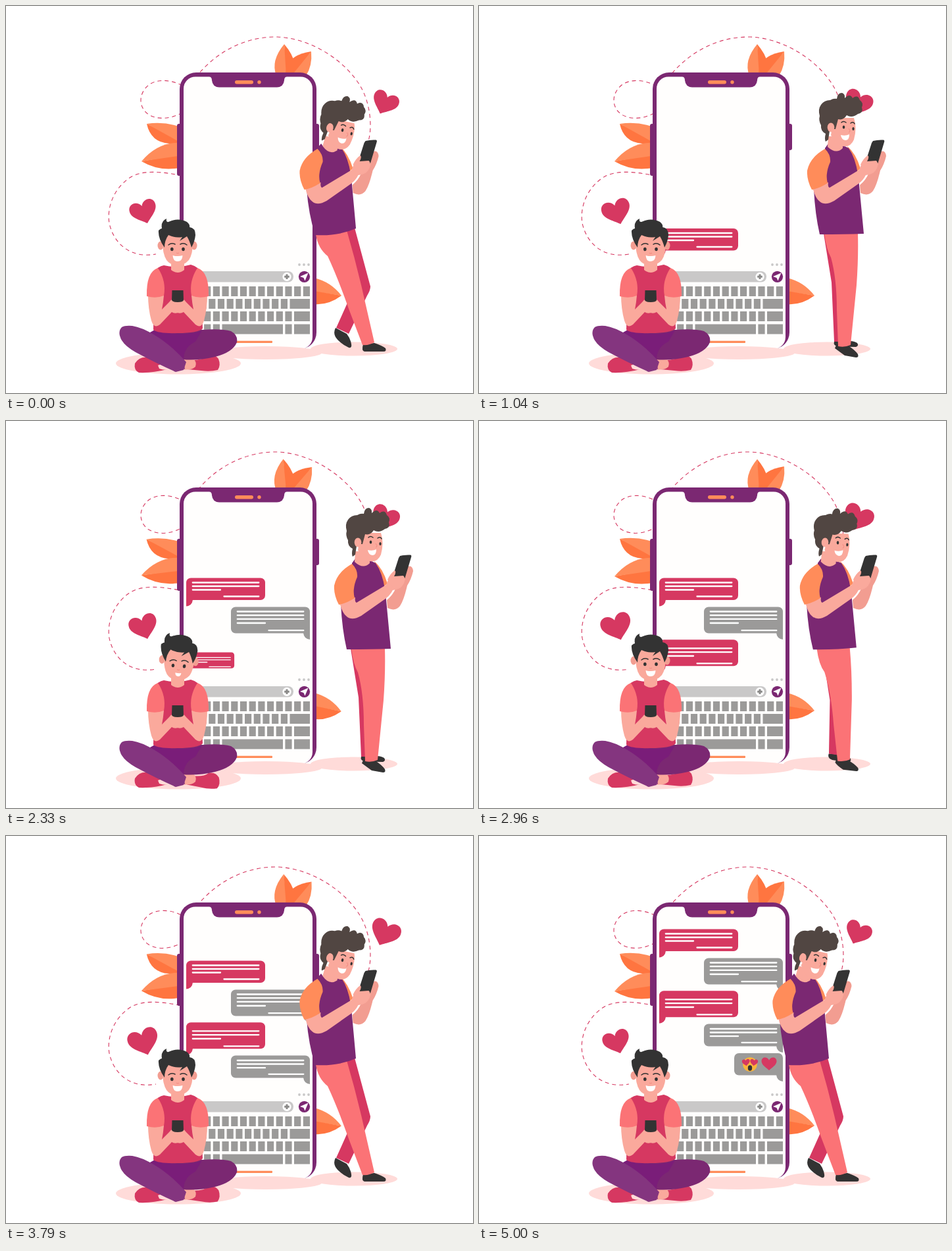
An HTML page that plays this animation: 710x588 px, repeating every 5040 ms.

```html
<!DOCTYPE html>
<html lang="en">
<head>
<meta charset="utf-8">
<title>Chat</title>
<style>
html, body { margin: 0; width: 100%; height: 100%; overflow: hidden; background: #fff; }
svg { display: block; width: 710px; height: 588px; }
.purple { fill: #7b2872 } .red { fill: #d63861 } .salmon { fill: #fb7376 }
.skin { fill: #faa99c } .shade { fill: #f29d91 } .dark { fill: #333 }
.hair { fill: #514642 } .light { fill: #ff8c5a } .deep { fill: #ff7540 }
.grey { fill: #9b9a99 } .pale { fill: #c9c8c8 } .pink { fill: #ffdbd9 } .white { fill: #fff }
.dash { fill: none; stroke: #d63861; stroke-width: 1.1; stroke-dasharray: 6 5 }
.brow { fill: none; stroke: #333; stroke-width: 1.5; stroke-linecap: round }
</style>
</head>
<body>
<svg viewBox="0 0 710 588">
  <defs>
    <path id="heart" class="red" d="M0 18C-7 11-20.500 4-20.500-6.500C-20.500-19-5-20.500 0-9.500C5-20.500 20.500-19 20.500-6.500C20.500 4 7 11 0 18Z"/>
    <g id="arm">
      <path class="skin" d="M216 439L240 440Q239 452 237 461L249 449Q252 443 261 447L266 464Q258 469 252 465L234 484Q225 491 221 478Q216 460 216 439Z"/>
      <path class="salmon" d="M231 398Q213 404 214 441Q228 445 240 440Q244 418 231 398Z"/>
    </g>
  </defs>

  <path class="dash" d="M288 109C320 68 366 46 413 47C470 50 520 88 540 124C552 145 558 180 551 205"/>
  <path class="dash" d="M268 121C250 111 229 111 217 120C200 134 202 155 217 165C232 174 252 171 268 162"/>
  <path class="dash" d="M268 258C235 251 206 249 188 261C164 277 153 306 157 330C164 362 190 384 228 377"/>
  <use href="#heart" id="heartL"/>
  <use href="#heart" id="heartR"/>

  <g data-sway="-2.5 417 104">
    <path class="light" d="M423 58Q402 83 411 106H428Z"/>
    <path class="deep" d="M423 58Q436 73 439 88L436 106H426Z"/>
  </g>
  <g data-sway="2.5 430 104">
    <path class="deep" d="M464 69Q433 74 427 92L424 106H438Z"/>
    <path class="light" d="M464 69Q466 91 456 106H434Z"/>
  </g>
  <g data-sway="-1.2 262 208">
    <path class="deep" d="M214 179Q220 207 248 209L268 210V205Z"/>
    <path class="light" d="M214 179Q243 175 268 185V209Z"/>
  </g>
  <g data-sway="2 262 227">
    <path class="deep" d="M206 236Q235 253 268 245V225Z"/>
    <path class="light" d="M206 236Q232 205 268 208V227Z"/>
  </g>
  <g data-sway="2.5 472 433">
    <path class="light" d="M510 440Q494 419 468 413V434Z"/>
    <path class="deep" d="M510 440Q490 455 468 453V433Z"/>
  </g>

  <g class="purple">
    <rect x="260" y="179" width="8" height="79" rx="3"/>
    <rect x="468" y="179" width="8" height="40" rx="3"/>
    <rect x="264" y="101" width="208" height="420" rx="25"/>
  </g>
  <rect x="270" y="107.500" width="196" height="413.500" rx="18" fill="#fffefd"/>
  <path class="purple" d="M309 107Q313 108 313 113Q314 123 324 123.500H412Q422 123 423 113Q423 108 427 107Z"/>
  <rect class="light" x="348" y="113" width="28" height="5.500" rx="2.750"/>
  <circle class="light" cx="385" cy="115.800" r="2.700"/>

  <g id="chat"></g>

  <g class="pale">
    <circle cx="446" cy="393" r="1.900"/><circle cx="453" cy="393" r="1.900"/><circle cx="460" cy="393" r="1.900"/>
    <rect x="274" y="403" width="163" height="16.500" rx="8"/>
  </g>
  <circle class="white" cx="427" cy="411.300" r="6.600"/>
  <path d="M427 407.500V415M423.200 411.300H430.800" stroke="#8b8a89" stroke-width="3"/>
  <circle class="purple" cx="453.500" cy="411.300" r="8.600"/>
  <path class="white" d="M447 411L459.500 405.500L454.500 417.500L452.500 413Z"/>
  <g id="keys" class="grey"></g>
  <rect class="light" x="330" y="508.800" width="75" height="3.200" rx="1"/>

  <g class="pink">
    <ellipse cx="395" cy="527" rx="85" ry="10"/>
    <ellipse cx="529" cy="521" rx="66" ry="10.500"/>
    <ellipse cx="262" cy="543" rx="95" ry="16.500"/>
  </g>

  <g id="legs"></g>
  <g id="upper">
    <path class="light" d="M560 213Q573 224 580 247L571 254Z"/>
    <path class="shade" d="M608 222Q618 217 619 228Q616 241 610 250Q605 272 599 281Q592 290 580 284L579 272Q590 263 594 250Z"/>
  </g>
  <g id="torso"></g>
  <g id="front">
    <path class="skin" d="M507 275L531 268Q530 275 533 276L578 249Q580 240 591 230L598 238L607 234Q608 246 600 253Q594 257 588 257Q584 265 577 270L540 296Q526 304 518 297Q511 292 507 275Z"/>
    <path class="dark" d="M599 205Q606 203 615 203.500Q617 204 616 207L607 237Q606 241 603 240L590 237Q588 236 589 233L597 208Z"/>
    <path class="skin" d="M580 241Q584 232 591 227Q594 229 590 236L604 235Q608 239 605 245Q601 254 590 255Z"/>
    <path class="light" d="M526 217Q503 230 499 250Q498 264 506 279Q518 277 530 269Q526 255 534 237Q535 226 526 217Z"/>
  </g>
  <g id="head">
    <path class="skin" d="M531 198H553V216Q543 226 530 214Z"/>
    <path class="skin" d="M540 170H570Q575 185 570 203Q565 215 553 213Q540 210 535 196Z"/>
    <path class="hair" d="M527 206Q525 202 527 194Q519 190 520 181Q516 174 518 167Q515 157 520 150Q525 143 534 143Q539 140 544 141Q545 132 552 132Q557 134 556 140Q564 132 568 140Q576 134 579 143Q585 147 582 154Q585 162 576 164Q567 171 559 166Q554 174 546 172L542 187H538L533 190L531 203Z"/>
    <ellipse class="skin" cx="535" cy="184.500" rx="5.300" ry="7"/>
    <ellipse class="dark" cx="554.500" cy="184" rx="1.800" ry="2.600"/>
    <ellipse class="dark" cx="569" cy="186.500" rx="1.600" ry="2.500"/>
    <path class="brow" d="M551 177Q554 174 558 177M565 178Q569 175 571 179"/>
    <path d="M562 186Q566 191 562 192" fill="none" stroke="#f28b82"/>
    <path class="white" d="M550 196Q557 198 563 195Q563 204 557 204Q551 203 550 196Z"/>
  </g>

  <g id="sitter">
    <path class="red" d="M196 543Q203 532 216 534Q228 537 242 544L245 552Q222 558 202 557Q194 553 196 543Z"/>
    <path class="pink" d="M231 546L246 541L250 552Q240 554 233 551Z"/>
    <path id="shoe" class="red" d="M283 538Q300 538 307 531Q317 528 323 536Q327 546 322 553Q310 556 297 554L276 552Z"/>
    <path class="skin" d="M262 534L283 535Q291 540 288 548Q282 554 268 552Z"/>
    <path class="purple" d="M240 493L298 492Q328 490 342 494Q353 500 351 511Q345 526 318 533Q292 539 268 537Z"/>
    <path d="M226 492L246 497Q284 500 298 493L288 510Q264 521 272 552L252 540L212 500Z" fill="#7a1d79"/>
    <path d="M176 488Q171 493 173 501Q176 514 197 526Q229 543 258 556L270 553L274 541Q251 515 226 500Q206 488 192 486Q181 485 176 488Z" fill="#84357f"/>
    <path class="red" d="M240 394Q261 399 281 393Q293 396 299 408L297 440L299 490Q292 497 261 497Q232 498 224 492L225 440L224 406Q231 395 240 394Z"/>
    <path class="skin" d="M251 384H271V401Q261 409 251 401Z"/>
    <use href="#arm"/>
    <use href="#arm" transform="translate(522)scale(-1 1)"/>
    <path class="dark" d="M252.500 432H269.500L270 447Q269 450 261 450Q253 450 252 447Z"/>
  </g>
  <g id="sitHead">
    <ellipse class="shade" cx="235" cy="364" rx="4.500" ry="6.500"/>
    <ellipse class="shade" cx="286" cy="364" rx="4.500" ry="6.500"/>
    <path class="skin" d="M238 352Q260 334 284 352Q285 376 278 386Q271 394 261 394Q250 394 244 386Q237 375 238 352Z"/>
    <path class="dark" d="M241 367Q231 353 232 341Q235 338 237 338Q235 327 244 323Q243 329 247 328Q262 321 275 328Q280 332 279 336Q288 337 288 348Q287 358 282 367Q279 356 275 350L264 357L268 351Q257 353 247 348Q241 356 241 367Z"/>
    <g id="face">
      <ellipse class="dark" cx="252.300" cy="369.500" rx="2.300" ry="2.800"/>
      <ellipse class="dark" cx="269.500" cy="369.500" rx="2.300" ry="2.800"/>
      <path class="brow" d="M247 363Q252 359 257 362M265 362Q270 359 275 363"/>
      <path d="M259 375Q261 377 263 375" fill="none" stroke="#f28b82"/>
      <path id="smile" class="white" d="M-7.500-4Q0-2 7.500-4Q7 5 0 5Q-7 5-7.500-4Z"/>
    </g>
  </g>
</svg>
<script>
const LOOP = 5040;
const $ = id => document.getElementById(id);
const clamp = u => Math.max(0, Math.min(1, u));
const ramp = (t, a, b) => clamp((t - a) / (b - a));
const smooth = u => u * u * (3 - 2 * u);
const ease = (t, a, b) => smooth(ramp(t, a, b));
const wave = (t, period) => (1 - Math.cos(2 * Math.PI * t / period)) / 2;
const set = (el, value, name = 'transform') => el.setAttribute(name, value);

// Keyboard: short keys fill each row up to the wide one.
const key = (x, y, w) => `<rect x="${x}" y="${y}" width="${w}" height="15"/>`;
const run = (x, y, n) => Array.from({ length: n }, (_, i) => key(x + 13.7 * i, y, 10.2)).join('');
$('keys').innerHTML =
  run(287.4, 426, 13) +
  run(294.5, 445, 10) + key(431.5, 445, 30.5) +
  run(287.4, 464, 11) + key(438, 464, 24) +
  run(287.4, 483.5, 3) + key(328.5, 483.5, 92.5) + key(424.4, 483.5, 10.2) + key(438, 483.5, 24);

// Messages: [mine, left, height, resting top, text line offsets]; the last line is the short right one.
const messages = [
  [0, 274, 33.5, 338, [7, 12.5, 18, 28]],
  [1, 342, 40, 382, [7, 12.7, 18.4, 24.5, 35.7]],
  [0, 274, 40, 431.8, [13, 18.8, 24.7, 36]],
  [1, 342, 34, 482, [7.5, 13, 18.7, 28.3]],
  [1, 388, 33.5, 526.5, []]
];
const lifts = [50, 49.5, 49, 48];
const appear = i => 285 + 937 * i;
const emoji = `<circle cx="412" cy="17" r="10.800" fill="#f9b53c"/>
  <use href="#heart" transform="translate(406 14)rotate(-8)scale(.29)"/>
  <use href="#heart" transform="translate(418 14)rotate(8)scale(.29)"/>
  <ellipse class="dark" cx="412" cy="22.500" rx="3.200" ry="4.200"/>
  <use href="#heart" transform="translate(441 16)scale(.56)"/>`;

$('chat').innerHTML = messages.map(([mine, x, h, , lines]) => {
  const right = mine ? 462 : 394, edge = mine ? 462 : 274, dir = mine ? -1 : 1;
  const text = lines.map((y, i) => {
    const rest = lines.length - 1 - i;
    const from = rest ? x + 9.8 : right - 62.5;
    const to = rest == 1 ? x + 52 : right - 9.7;
    return `M${from} ${y}H${to}`;
  }).join('');
  return `<g><g class="${mine ? 'grey' : 'red'}">
    <rect x="${x}" y="0" width="${right - x}" height="${h}" rx="7"/>
    <path d="M${edge} ${h - 9}V${h + 9.5}q${9 * dir} -1 ${10 * dir} -10v-8z"/></g>
    <path d="${text}" stroke="#fff" stroke-width="2.300" stroke-linecap="round"/>${lines.length ? '' : emoji}</g>`;
}).join('');
const bubbles = [...$('chat').children];

// Parts of the standing man that bend: leaning outline, upright outline.
const bends = [
  ['legs', 'dark',
    'M501 489L518 498Q524 506 525 514Q526 520 521 519Q512 515 504 507Q496 498 501 489Z',
    'M540 510L556 509Q568 508 575 512Q578 516 573 518Q560 518 546 517Q538 516 540 510Z'],
  ['legs', 'red',
    'M510 343L530 337L554 426Q554 432 549 440L521 498L502 489L524 440Z',
    'M524 346L560 346L568 424Q568 432 564 440L552 510L540 510L536 420Z'],
  ['legs', 'dark',
    'M543 514L560 512Q572 516 577 520Q579 525 574 525L545 525Q540 524 543 514Z',
    'M545 511L561 516Q571 522 576 529Q578 534 573 534Q556 531 545 523Q541 520 545 511Z'],
  ['legs', 'salmon',
    'M471 347L518 341Q530 382 540 424L560 511Q552 516 542 515L521 460Q504 412 489 380Q474 368 471 347Z',
    'M525 346L576 346Q577 382 574 424L565 515Q556 519 546 517L544 462Q544 414 535 382Q528 370 525 346Z'],
  ['torso', 'purple',
    'M474 215L479 209Q490 226 502 212L510 216Q523 234 526 272L532 338Q505 350 470 348Q460 317 457 278L474 240Z',
    'M526 216L531 209Q542 226 554 212L562 216Q575 234 578 272L585 346Q555 347 518 347Q511 317 509 278L526 240Z']
].map(([id, fill, lean, stand]) => {
  const el = document.createElementNS('http://www.w3.org/2000/svg', 'path');
  set(el, fill, 'class');
  $(id).append(el);
  return { el, lean, ends: stand.match(/\d+/g) };
});
function bend({ el, lean, ends }, k) {
  let i = 0;
  set(el, lean.replace(/\d+/g, n => (+n + (ends[i++] - n) * k).toFixed(2)), 'd');
}

const dashes = document.querySelectorAll('.dash');
const leaves = [...document.querySelectorAll('[data-sway]')].map(el => {
  const [angle, x, y] = el.dataset.sway.split(' ');
  return { el, angle, x, y };
});

function render(t) {
  dashes.forEach(el => set(el, 11 * t / LOOP, 'stroke-dashoffset'));

  const beat = 1 + .14 * wave(t, 833.3);
  set($('heartL'), `translate(209.500 313)rotate(-18)scale(${beat})`);
  set($('heartR'), `translate(576 147.500)rotate(24)scale(${beat * .98})`);
  const sway = wave(t, 1000);
  leaves.forEach(({ el, angle, x, y }) => set(el, `rotate(${angle * sway} ${x} ${y})`));

  const lift = lifts.reduce((sum, d, i) => sum + d * ease(t, appear(i + 1) - 100, appear(i + 1) + 150), 0);
  messages.forEach(([mine, , h, top], i) => {
    const s = ease(t, appear(i), appear(i) + 300), x = mine ? 462 : 274, foot = h + 9;
    set(bubbles[i], `translate(${x * (1 - s)} ${top - lift + foot * (1 - s)})scale(${s})`);
    bubbles[i].style.display = s ? '' : 'none';
  });

  const stand = ramp(t, 0, 1000) - ramp(t, 2750, 3750), back = stand - 1;
  bends.forEach(part => bend(part, stand));
  set($('upper'), `translate(${52.5 * back})`);
  set($('front'), `translate(${52.5 * back})`);
  set($('head'), `translate(${48.5 * back} ${-1.2 * back})rotate(${-12 * back} 541 212)`);

  const early = ease(t, 40, 540) - ease(t, 600, 1080) + ease(t, 1670, 2200) - ease(t, 2330, 2800);
  const tap = early + ease(t, 3500, 4100) - ease(t, 4330, 4850);
  const nod = early + ease(t, 3790, 4250) - ease(t, 4400, 4850);
  set($('shoe'), `rotate(${6 * tap} 272 545)`);
  set($('sitHead'), `rotate(${4 * nod} 261 395)`);
  set($('face'), `translate(0 ${2.5 * nod})`);
  set($('smile'), `translate(261 ${383 - .5 * nod})scale(${1 - .4 * nod})`);
}

const start = performance.now();
function frame() {
  render((performance.now() - start) % LOOP);
  requestAnimationFrame(frame);
}
frame();
</script>
</body>
</html>
```
